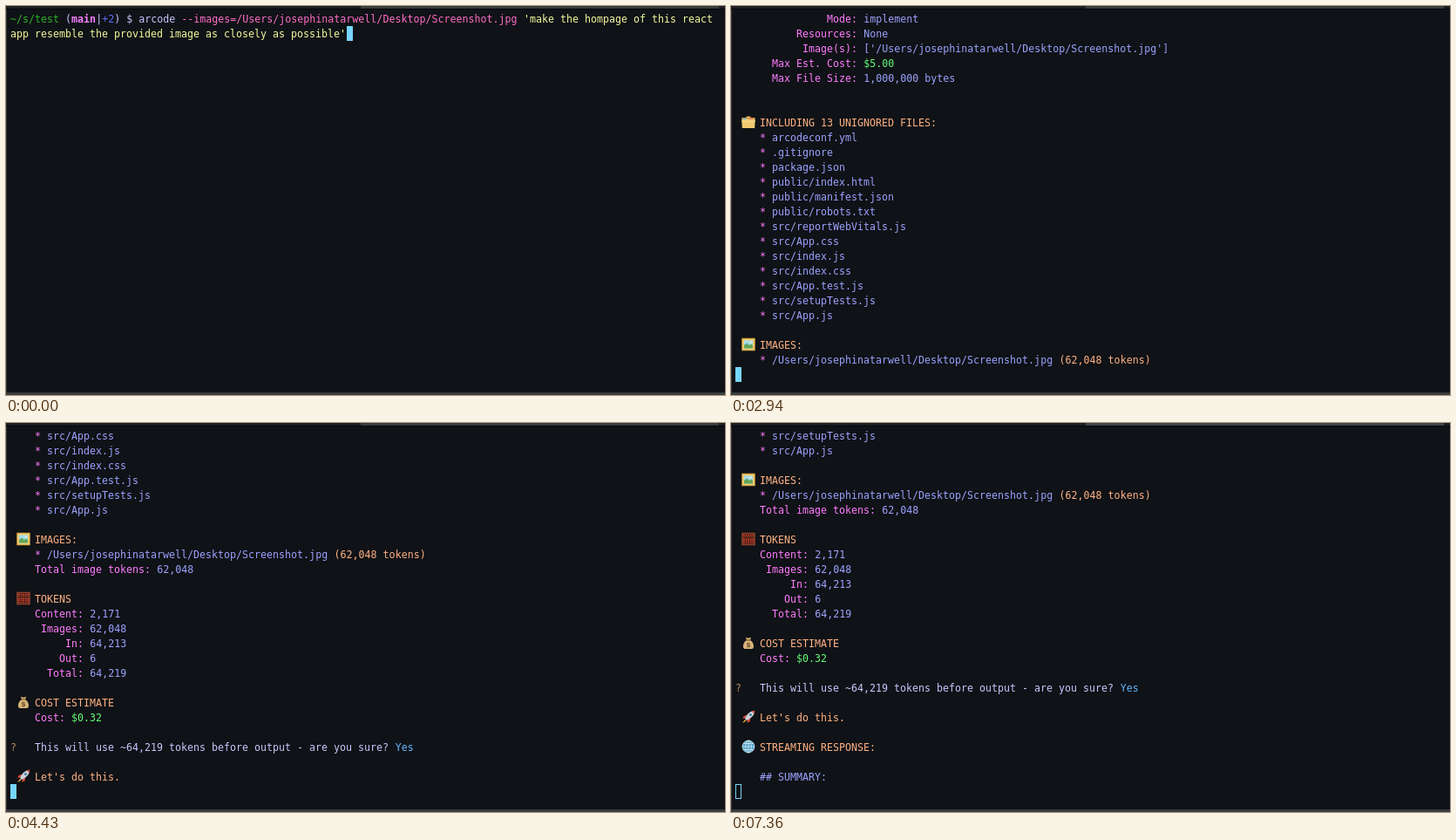
An HTML page that plays this animation: 825x446 px, repeating every 8 s.

```html
<!DOCTYPE html>
<html lang="en">
<head>
<meta charset="utf-8">
<title>Terminal session</title>
<style>
  html, body { margin: 0; width: 100%; height: 100%; overflow: hidden; background: #0f1216; }
  #stage { position: relative; width: 825px; height: 446px; overflow: hidden; background: #0f1216; }
  #stage * { animation: 8s step-end infinite; }

  .edge { position: absolute; background: #3a3d40; }
  #top { left: 0; top: 0; width: 825px; height: 3px; background: #1c1f22; border-bottom: 1px solid #050608; }
  #tab { left: 407px; top: 0; width: 411px; height: 3px; animation-name: blur !important; }
  #left { left: 0; top: 4px; width: 1px; height: 442px; }
  #bottom { left: 0; top: 443px; width: 825px; height: 3px; }

  #view { position: absolute; left: 5px; top: 6px; width: 820px; height: 425px; overflow: hidden; }
  #log { animation-name: scroll !important; }
  .row { position: absolute; left: 0; height: 17px; white-space: pre; letter-spacing: .012px;
    font: 11.627px/17px "DejaVu Sans Mono", "Liberation Mono", monospace; }
  .row span { position: absolute; top: 1px; }
  .row svg { position: absolute; left: 7px; top: 0; width: 16px; height: 16px; }
  #cursor { position: absolute; box-sizing: border-box; width: 7px; height: 17px;
    background: #76d6ff; border: 1px solid #76d6ff; animation-name: move, hollow !important; }

  .g { color: #2db526; } .w { color: #cbc6ff; } .b { color: #f780ff; font-weight: bold; }
  .u { color: #5f6ffa; } .p { color: #ff6ec8; } .y { color: #f6fa9e; } .o { color: #ffb284; }
  .m { color: #ff7cff; } .v { color: #9da2ff; } .c { color: #64fb78; } .s { color: #64b6ff; }
  .r { color: #e27b45; } .t { color: #b58c5f; } .n { color: #b9b7ca; }

  #stage .build { animation-name: build; }
  #stage .files { animation-name: files; }
  #stage .cost { animation-name: cost; }
  #stage .ask { animation-name: ask; }
  #stage .go { animation-name: go; }
  #stage .reply { animation-name: reply; }
  @keyframes build { 0% { opacity: 0 } 15%, 100% { opacity: 1 } }
  @keyframes files { 0% { opacity: 0 } 36.75%, 100% { opacity: 1 } }
  @keyframes cost { 0% { opacity: 0 } 37.5%, 100% { opacity: 1 } }
  @keyframes ask { 0% { opacity: 0 } 37.5% { opacity: 1 } 55.375%, 100% { opacity: 0 } }
  @keyframes go { 0% { opacity: 0 } 55.375%, 100% { opacity: 1 } }
  @keyframes reply { 0% { opacity: 0 } 92%, 100% { opacity: 1 } }
  @keyframes scroll {
    0% { transform: none }
    36.75% { transform: translateY(-204px) }
    37.5% { transform: translateY(-408px) }
    55.375% { transform: translateY(-459px) }
    92%, 100% { transform: translateY(-527px) }
  }
  @keyframes move {
    0% { transform: translate(386px, 17px) }
    15% { transform: translate(0, 306px) }
    36.75% { transform: translate(0, 408px) }
    37.5% { transform: translate(484px, 408px) }
    55.375%, 100% { transform: translate(0, 408px) }
  }
  @keyframes hollow { 0% { background: #76d6ff } 87.625%, 100% { background: transparent } }
  @keyframes blur { 0% { background: #3a3d40 } 87.625%, 100% { background: #424548 } }
</style>
</head>
<body>
<svg width="0" height="0" style="position:absolute">
  <symbol id="crane" viewBox="0 0 16 16">
    <path d="M1 4.5H15M5 2V14M5 2L14 4.5M5 2L1 4.5" stroke="#b98b5b" stroke-width="1.4" fill="none"/>
    <path d="M3.5 5V14M6.5 5V14M3.5 8L6.5 11M6.5 8L3.5 11" stroke="#8d6440" fill="none"/>
    <path d="M12.5 5V10" stroke="#999" stroke-width=".7"/>
    <path d="M1 13H8V15H1ZM9 13.5H15V15H9Z" fill="#70503b"/>
    <path d="M11 10H14V11.5H11Z" fill="#a67452"/>
  </symbol>
  <symbol id="gear" viewBox="0 0 16 16">
    <circle cx="8" cy="8" r="6.8" fill="none" stroke="#9a9fa3" stroke-width="1.8" stroke-dasharray="1.7 .97"/>
    <circle cx="8" cy="8" r="5.2" fill="#5d6266" stroke="#b0b5b9" stroke-width="1.8"/>
    <path d="M8 8V3M8 8L3.8 10.5M8 8L12.2 10.5" stroke="#b0b5b9" stroke-width="1.4"/>
    <circle cx="8" cy="8" r="2" fill="#b9bec2"/>
  </symbol>
  <symbol id="folders" viewBox="0 0 16 16">
    <path d="M.5 3H5L6 1.5H10L11 3H15.5V8H.5Z" fill="#d9a948"/>
    <path d="M2 3.5H6V5H2Z" fill="#6bb5d8"/><path d="M9 3H13V5H9Z" fill="#e17d62"/>
    <path d="M.3 5H15.7L15.2 15H.8Z" fill="#f0ca70"/>
    <path d="M.5 7.5H15.5" stroke="#f8e3a2" stroke-width=".8"/>
  </symbol>
  <symbol id="picture" viewBox="0 0 16 16">
    <rect x=".2" y=".7" width="15.6" height="14.6" fill="#c7953a"/>
    <rect x="1.2" y="1.7" width="13.6" height="12.6" fill="#f0cf72"/>
    <rect x="3" y="3.5" width="10" height="9" fill="#a5dcef"/>
    <path d="M3 9L6 6.5L9 9L11 7.5L13 9V12.5H3Z" fill="#62a557"/>
    <circle cx="10.8" cy="5.5" r="1" fill="#fff6bb"/>
  </symbol>
  <symbol id="abacus" viewBox="0 0 16 16">
    <rect x="1" y="1.5" width="14" height="13" fill="#321713" stroke="#98442d" stroke-width="1.5"/>
    <path d="M2 5.8H14" stroke="#98442d"/>
    <path d="M2 3.8H14M2 8.2H14M2 10.3H14M2 12.4H14" stroke="#d6432f" stroke-width="1.4" stroke-dasharray="1.8 .8"/>
  </symbol>
  <symbol id="money" viewBox="0 0 16 16">
    <path d="M6 5C1 8 1 15 4 15H12C15 15 15 8 10 5L11 1.8L8 2.8L5 1.8Z" fill="#d6b279"/>
    <path d="M5.5 5H10.5" stroke="#8f6434" stroke-width="1.4"/>
    <text x="8" y="13.2" text-anchor="middle" font-family="Liberation Sans, sans-serif" font-size="8" font-weight="bold" fill="#62451f">$</text>
  </symbol>
  <symbol id="rocket" viewBox="0 0 16 16">
    <path d="M4 11L1 15L5.5 12.5Z" fill="#f6b53c"/>
    <path d="M7 5.5L2.5 7L1.5 10L5 9ZM10.5 9L9.5 13.5L6.5 14.8L7 11Z" fill="#d9483b"/>
    <path d="M15.2 .8C10.5 .8 6.5 4.5 4 10L6 12C11.5 9.5 15.2 5.5 15.2 .8Z" fill="#cdd3d9"/>
    <path d="M15.2 .8L11.8 1.6L14.4 4.2Z" fill="#d9483b"/>
    <circle cx="10.4" cy="5.6" r="1.5" fill="#417ea8"/>
  </symbol>
  <symbol id="globe" viewBox="0 0 16 16">
    <circle cx="8" cy="8" r="7.2" fill="#4c9cc5"/>
    <g fill="none" stroke="#d4ecf5" stroke-width=".8">
      <circle cx="8" cy="8" r="6.9"/><ellipse cx="8" cy="8" rx="3.3" ry="7"/>
      <path d="M8 1V15M1 8H15M2.2 4.5H13.8M2.2 11.5H13.8"/>
    </g>
  </symbol>
</svg>

<div id="stage">
  <div class="edge" id="top"></div><div class="edge" id="tab"></div>
  <div class="edge" id="left"></div><div class="edge" id="bottom"></div>
  <div id="view"><div id="log"></div><div id="cursor"></div></div>
</div>

<script>
const CELL = 7.012, LINE = 17;
const log = document.getElementById('log');
const shot = '/Users/josephinatarwell/Desktop/Screenshot.jpg';
const wish = 'make the hompage of this react app resemble the provided image as closely as possible';
const question = 'w   This will use ~64,219 tokens before output - are you sure? ';

// Each part is a colour letter followed by its text.
function line(batch, row, parts, icon) {
  const el = document.createElement('div');
  el.className = 'row ' + batch;
  el.style.top = row * LINE + 'px';
  if (icon) el.innerHTML = `<svg><use href="#${icon}"/></svg>`;
  let col = 0;
  for (const part of parts) {
    const span = document.createElement('span');
    span.className = part[0];
    span.textContent = part.slice(1);
    span.style.left = col * CELL + 'px';
    col += part.length - 1;
    el.append(span);
  }
  log.append(el);
}

const heading = (batch, row, icon, text) => line(batch, row, ['o    ' + text], icon);

function fields(batch, row, width, list) {
  for (const [name, value, tint = 'v'] of list)
    line(batch, row++, ['m' + (name + ':').padStart(width) + ' ', tint + value]);
}

line('', 0, ['g~/s/test ', 'w(', 'bmain', 'w|', 'u+2', 'w) $ ', 'warcode ',
  'p--images=' + shot + ' ', "y'" + wish.slice(0, 30)]);
line('', 1, ['y' + wish.slice(31) + "'"]);

heading('build', 2, 'crane', 'BUILDING FEATURE:');
line('build', 3, ['p    > ', 'v' + wish]);
heading('build', 5, 'gear', 'CONFIGURATION:');
fields('build', 6, 20, [
  ['Directory', '.'],
  ['Model', 'openai/gpt-4o'],
  ['Embedding Model', 'openai/text-embedding-3-small'],
  ['Auto-write', 'False'],
  ['Focused', '0'],
  ['Ignore', "['package-lock.json', 'README.md']"],
  ['Mode', 'implement'],
  ['Resources', 'None'],
  ['Image(s)', `['${shot}']`],
  ['Max Est. Cost', '$5.00', 'c'],
  ['Max File Size', '1,000,000 bytes']
]);

heading('files', 19, 'folders', 'INCLUDING 13 UNIGNORED FILES:');
['arcodeconf.yml', '.gitignore', 'package.json', 'public/index.html', 'public/manifest.json',
  'public/robots.txt', 'src/reportWebVitals.js', 'src/App.css', 'src/index.js', 'src/index.css',
  'src/App.test.js', 'src/setupTests.js', 'src/App.js'
].forEach((file, i) => line('files', 20 + i, ['m    * ', 'v' + file]));
heading('files', 34, 'picture', 'IMAGES:');
line('files', 35, ['m    * ', 'v' + shot, 'o (62,048 tokens)']);

fields('cost', 36, 23, [['Total image tokens', '62,048']]);
heading('cost', 38, 'abacus', 'TOKENS');
fields('cost', 39, 12, [
  ['Content', '2,171'], ['Images', '62,048'], ['In', '64,213'], ['Out', '6'], ['Total', '64,219']
]);
heading('cost', 45, 'money', 'COST ESTIMATE');
fields('cost', 46, 9, [['Cost', '$0.32', 'c']]);

line('ask', 48, ['r?', question, 'n(Y/n)']);
line('go', 48, ['t?', question, 'sYes']);
heading('go', 50, 'rocket', "Let's do this.");

heading('reply', 52, 'globe', 'STREAMING RESPONSE:');
line('reply', 54, ['v    ## SUMMARY:']);
</script>
</body>
</html>
```
